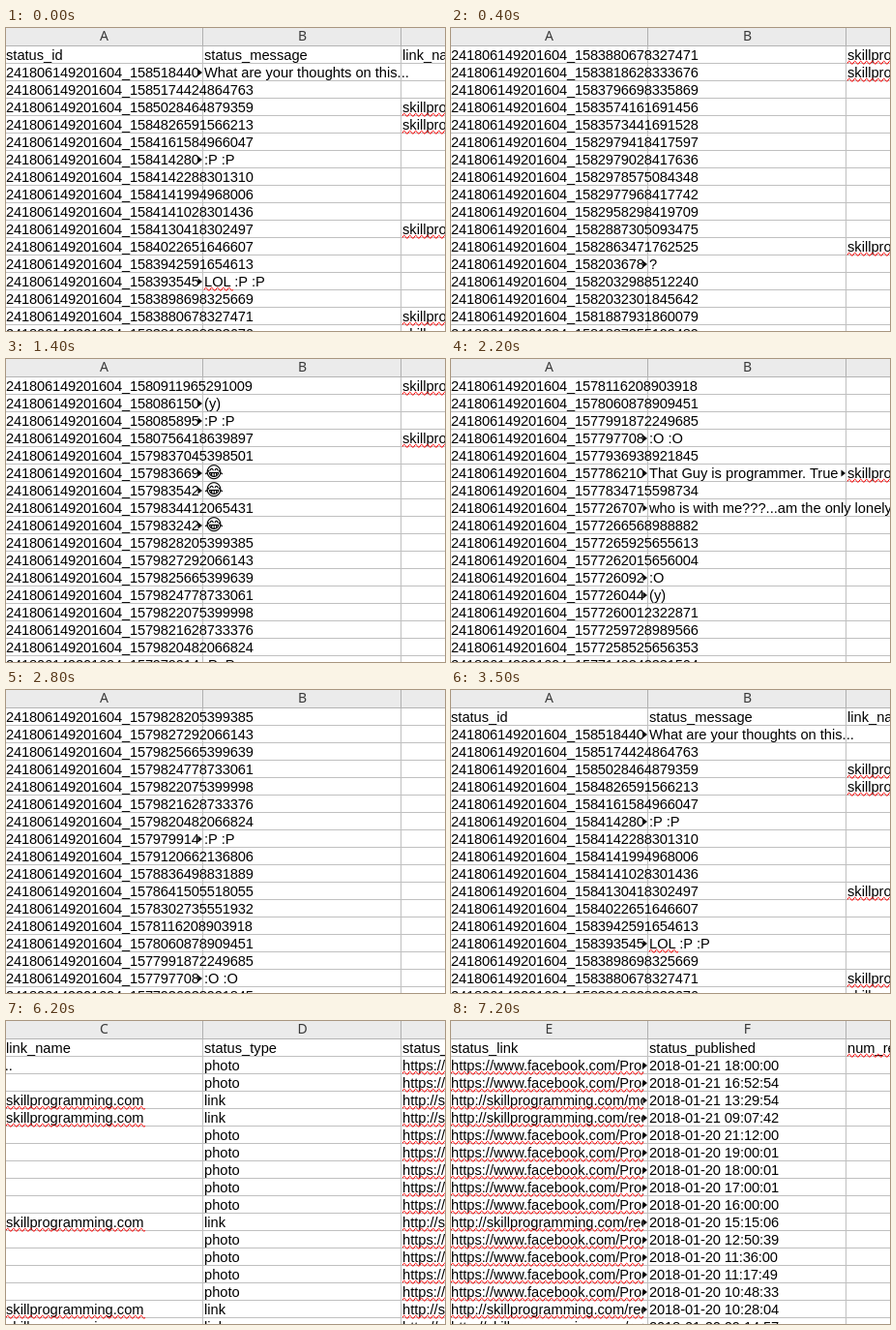
Write an HTML page that moves like this. It is 454 px wide and 313 px high and loops after 8000 ms.

```html
<!DOCTYPE html>
<html lang="en">
<head>
<meta charset="utf-8">
<title>Spreadsheet scroll</title>
<style>
html, body { margin: 0; width: 100%; height: 100%; overflow: hidden; background: #fff; }
svg { display: block; }
text { font: 14.667px "Liberation Sans", Arial, sans-serif; fill: #000; white-space: pre; }
.num { letter-spacing: -.158px; }
.date { letter-spacing: -.11px; }
.face { font: 17px "DejaVu Sans", sans-serif; }
.head { font: 14px "Noto Sans", sans-serif; fill: #3a3a3a; text-anchor: middle; }
.wave { fill: none; stroke: #f00; stroke-width: 1; }
</style>
</head>
<body>
<svg id="stage" width="454" height="313" viewBox="0 0 454 313"></svg>
<script>
const LOOP = 8000, COL = 205, ROW = 18, ROWS = 17;
const stage = document.getElementById('stage');
const pen = document.createElement('canvas').getContext('2d');
pen.font = '14.667px "Liberation Sans", Arial, sans-serif';

const HEADS = ['status_id', 'status_message', 'link_name', 'status_type',
  'status_link', 'status_published', 'num_reactions'];
const ID = '241806149201604_15';
const SITE = 'skillprogramming.com';

// Row 2 onward: id ending, "*" for a link post, then the message
const POSTS = `8518440 What are your thoughts on this...
85174424864763
85028464879359*
84826591566213*
84161584966047
8414280 :P :P
84142288301310
84141994968006
84141028301436
84130418302497*
84022651646607
83942591654613
8393545 LOL :P :P
83898698325669
83880678327471*
83818628333676*
83796698335869
83574161691456
83573441691528
82979418417597
82979028417636
82978575084348
82977968417742
82958298419709
82887305093475
82863471762525*
8203678 ?
82032988512240
82032301845642
81887931860079
81887355193489
81645288550910
81402175241888
81133291935443
80964508618601
80911965291009*
8086150 (y)
8085895 :P :P
80756418639897*
79837045398501
7983669 😂
7983542 😂
79834412065431
7983242 😂
79828205399385
79827292066143
79825665399639
79824778733061
79822075399998
79821628733376
79820482066824
7979914 :P :P
79120662136806
78836498831889
78641505518055
78302735551932
78116208903918
78060878909451
77991872249685
7797708 :O :O
77936938921845
7786210* That Guy is programmer. True Story
77834715598734
7726707 who is with me???...am the only lonely
77266568988882
77265925655613
77262015656004
7726092 :O
7726044 (y)
77260012322871
77259728989566
77258525656353
77149342331504
77148719000234
77146535667119
77021142346325
77019825679790
76988409016265
76987515683021
76986662349773`.split('\n').map(line => {
  const [, id, star, msg] = line.match(/^(\d+)(\*?) ?(.*)$/);
  return { id: id.padEnd(14, '0'), link: !!star, msg };
});

const DATES = `21 18:00:00,21 16:52:54,21 13:29:54,21 09:07:42,20 21:12:00,20 19:00:01,
20 18:00:01,20 17:00:01,20 16:00:00,20 15:15:06,20 12:50:39,20 11:36:00,20 11:17:49,
20 10:48:33,20 10:28:04,20 09:14:57`.split(/,\s*/);

// [time, first row, first column]
const VIEWS = [[0, 1, 0]];
function scroll(from, tops) {
  tops.forEach((top, i) => VIEWS.push([from + i * 100, top, 0]));
}
scroll(200, [4, 10, 16]);
scroll(700, [19, 22, 25, 28, 31, 34]);
scroll(1400, [37, 40, 43]);
scroll(1800, [46, 49, 52, 55, 58, 61, 64]);
scroll(2600, [58, 52, 46, 40]);
scroll(3100, [31, 22, 13, 4, 1]);
[5500, 6200, 6800, 7200].forEach((time, i) => VIEWS.push([time, 1, i + 1]));

// Content of one cell: text, style class, misspelt part
function cell(row, col) {
  if (row === 1) return { text: HEADS[col] || '', bad: col === 6 ? HEADS[6] : '' };
  const post = POSTS[row - 2];
  if (!post) return { text: '' };
  switch (col) {
    case 0: return { text: ID + post.id, cls: 'num' };
    case 1:
      if (post.msg === '😂') return { text: '😂\uFE0E', cls: 'face' };
      return { text: post.msg, bad: post.msg.startsWith('LOL') ? 'LOL' : '' };
    case 2: return post.link ? { text: SITE, bad: SITE } : { text: '' };
    case 3: return { text: post.link ? 'link' : 'photo' };
    case 4: {
      const url = post.link
        ? `http://${SITE}/` + (row === 4 ? 'mobile' : 'recent')
        : 'https://www.facebook.com/Programming';
      return { text: url, bad: url };
    }
    case 5: return { text: DATES[row - 2] ? '2018-01-' + DATES[row - 2] : '', cls: 'date' };
  }
  return { text: '' };
}

const rect = (x, y, w, h, fill) =>
  `<rect x="${x}" y="${y}" width="${w}" height="${h}" fill="${fill}"/>`;

const label = (x, y, text, cls = '') =>
  `<text x="${x}" y="${y}" class="${cls}">${text}</text>`;

function wave(x, y, width) {
  let d = `M${x} ${y + 3.5}`;
  for (let w = 0; w < width; w += 6) d += 'q1.5 -4 3 -1t3 1';
  return `<path class="wave" d="${d}"/>`;
}

function drawCell(row, col, x, y) {
  const { text, cls, bad } = cell(row, col);
  if (!text) return '';
  const width = pen.measureText(text).width;
  let out = label(x, y, text, cls);
  if (bad) out += wave(x, y, pen.measureText(bad).width);
  if (width < COL - 4 || !cell(row, col + 1).text) return out;
  const tip = x + COL - 2, mid = y - 5;
  return `<svg x="${x}" y="0" width="${COL - 6}" height="313" viewBox="${x} 0 ${COL - 6} 313">${out}</svg>`
    + `<path d="M${tip - 4.5} ${mid - 3.5}L${tip} ${mid}L${tip - 4.5} ${mid + 3.5}z"/>`;
}

function draw(top, left) {
  let out = rect(0, 0, 454, 313, '#fff') + rect(0, 0, 454, 18, '#ebebeb');
  for (let i = 1; i < ROWS; i++) out += rect(0, 18 + i * ROW, 454, 1, '#c0c0c0');
  for (const x of [203, 408]) {
    out += rect(x, 19, 1, 294, '#c0c0c0') + rect(x, 0, 1, 18, '#b0b0b0');
  }
  out += rect(0, 18, 454, 1, '#b4b4b4');
  for (let c = 0; c < 3; c++) {
    out += label(101.5 + c * COL, 13, 'ABCDEFG'[left + c], 'head');
  }
  for (let r = 0; r < ROWS; r++) {
    for (let c = left ? -1 : 0; c < 3; c++) {
      out += drawCell(top + r, left + c, c * COL, 33 + r * ROW);
    }
  }
  stage.innerHTML = out;
}

let shown = null;
const start = performance.now();
function tick() {
  const t = (performance.now() - start) % LOOP;
  const view = VIEWS.findLast(v => v[0] <= t);
  if (view !== shown) {
    shown = view;
    draw(view[1], view[2]);
  }
  requestAnimationFrame(tick);
}
tick();
</script>
</body>
</html>
```
